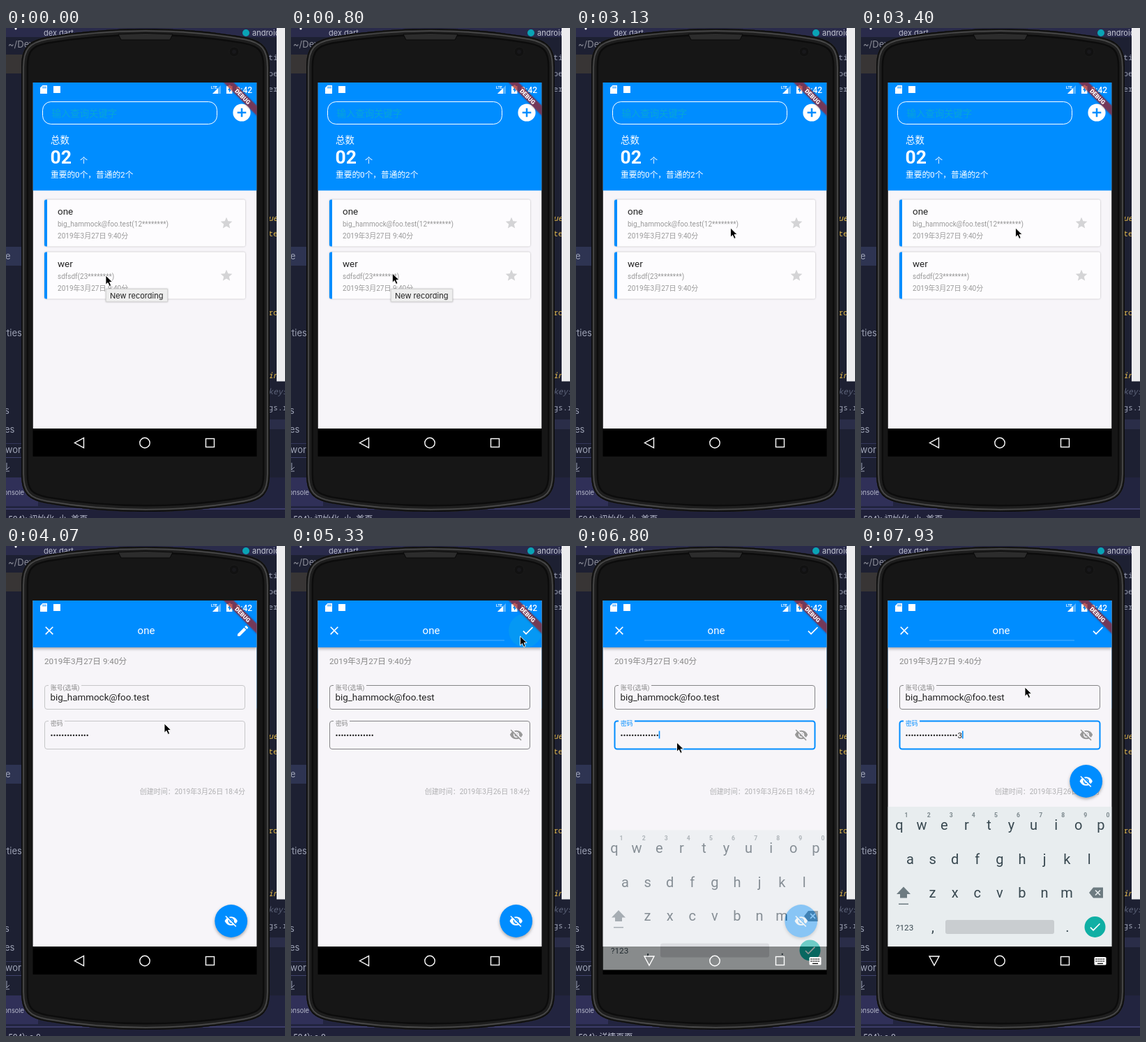
Animation, 400 px wide and 701 px high, one loop 8000 ms. Source, as an HTML page:

```html
<!DOCTYPE html>
<html lang="zh">
<head>
<meta charset="utf-8">
<title>Password notes</title>
<style>
  html, body { margin: 0; width: 100%; height: 100%; overflow: hidden; background: #1d2032; }
  svg { display: block; width: 100vw; height: 100vh; }
  text { font-family: Roboto, "Noto Sans CJK SC", "Noto Sans CJK", sans-serif; white-space: pre; }
  .mid { text-anchor: middle; }
  .end { text-anchor: end; }
  .ui { font-family: Inter, Roboto, sans-serif; }
  .code { font-family: "Noto Sans Mono", "DejaVu Sans Mono", monospace; }
  .card { filter: drop-shadow(0 .8px .8px #0004); }
  .raised { filter: drop-shadow(0 2px 2px #0005); }
  .line { fill: none; stroke: #fff; stroke-width: 1.4; }
</style>
</head>
<body>
<script>
const LOOP = 8000;
const BLUE = '#008dff', PAGE = '#f7f5f9';
const ACCOUNT = 'big_hammock@foo.test';
const EDITED = '2019年3月27日 9:40分';
const LEFT = 38.5, WIDTH = 321;   // phone screen

const text = (x, y, size, fill, content, extra = '') =>
  `<text x="${x}" y="${y}" font-size="${size}" fill="${fill}" ${extra}>${content}</text>`;
const rect = (x, y, w, h, fill, extra = '') =>
  `<rect x="${x}" y="${y}" width="${w}" height="${h}" fill="${fill}" ${extra}/>`;
const circle = (x, y, r, fill, extra = '') =>
  `<circle cx="${x}" cy="${y}" r="${r}" fill="${fill}" ${extra}/>`;
const band = (y, h, fill, extra) => rect(LEFT, y, WIDTH, h, fill, extra);
// 24-unit icon drawn at 20 px around a centre
const icon = (name, x, y, color, extra = '') =>
  `<use href="#${name}" transform="translate(${x - 10} ${y - 10}) scale(.836)" fill="${color}" stroke="${color}" ${extra}/>`;

const PHONE = 'M22 56C22 28 32 18 58 13C110 4 160 1 200 1S290 4 342 13C368 18 378 28 378 56V638' +
  'C378 666 368 675 342 680C290 689 240 692 200 692S110 689 58 680C32 675 22 666 22 638Z';

const defs = `<defs>
  <clipPath id="screen">${band(78, 535)}</clipPath>
  <clipPath id="content">${band(78, 495)}</clipPath>
  <clipPath id="body"><path d="${PHONE}"/></clipPath>
  <mask id="slit"><rect width="24" height="24" fill="#fff"/><path d="M3 1.5L22.5 21" stroke="#000" stroke-width="2.4"/></mask>
  <path id="star" stroke="none" d="M12 17.27L18.18 21l-1.64-7.03L22 9.24l-7.19-.61L12 2 9.19 8.63 2 9.24l5.46 4.73L5.82 21z"/>
  <path id="check" stroke="none" d="M9 16.17L4.83 12l-1.42 1.41L9 19 21 7l-1.41-1.41z"/>
  <path id="close" stroke-width="2" d="M5.7 5.7L18.3 18.3M18.3 5.7L5.7 18.3"/>
  <path id="pencil" stroke="none" d="M3 17.25V21h3.75L17.81 9.94l-3.75-3.75zM20.71 7.04c.39-.39.39-1.02 0-1.41l-2.34-2.34c-.39-.39-1.02-.39-1.41 0l-1.83 1.83 3.75 3.75z"/>
  <g id="eyeOff"><g mask="url(#slit)" stroke="none">
    <path fill-rule="evenodd" d="M1 12Q4.5 4.5 12 4.5T23 12Q19.5 19.5 12 19.5T1 12zM7 12a5 5 0 0 0 10 0a5 5 0 0 0-10 0z"/>
    <circle cx="12" cy="12" r="3"/></g><path d="M2.6 3.6L20.4 21.4" stroke-width="1.8"/></g>
</defs>`;

function desktop() {
  const grey = '#9da2b4', gold = '#e2b84c', dim = '#5d6379';
  const left = [['~/Dev', 3, 28, '#8b8d98'], ['e', -1, 331], ['rties', -4, 441], ['s', -2, 552],
    ['es', -2, 579], ['swor', -8, 608]];
  const right = [['ti', 46, grey], ['pe', 69, grey], ['er', 91, grey], ['ue', 276, gold, 1], ['te', 298, gold],
    ['ro', 411, gold], ['in', 501, gold, 1], ['keys', 524, dim, 1], ['gs.r', 547, grey]];
  return rect(0, 0, 400, 701, '#1d2032') + rect(0, 0, 400, 13, '#2a2b4b') +
    rect(0, 38, 60, 27, '#383535') + rect(0, 313, 60, 27, '#2e3452') +
    rect(0, 594, 60, 1, '#34375a') + rect(0, 614, 60, 1, '#41446c') + rect(340, 560, 60, 14, '#2a2d48') +
    rect(0, 643, 400, 44, '#22243f') + rect(0, 643, 46, 41, '#303058') +
    rect(0, 687, 400, 2, '#3c3c68') + rect(0, 689, 400, 12, '#1f2038') +
    circle(14, 1, 1.5, '#fff') +
    text(54, 11, 11, '#b9bccb', 'dex.dart', 'class="ui"') + circle(344, 7, 5, '#0aa3b5') +
    text(353, 11, 11, '#c5c8d4', 'android', 'class="ui"') +
    left.map(([s, x, y, c = grey]) => text(x, y, 13, c, s, 'class="ui"')).join('') +
    right.map(([s, y, c, slant]) => text(376, y, 11.5, c, s, `class="code" ${slant ? 'font-style="italic"' : ''}`)).join('') +
    `<path d="M1 622v9M-3 628l4 4 4-4M-2 634h7" fill="none" stroke="${grey}"/>` +
    text(-3, 668, 9.2, '#b7bacb', 'onsole', 'class="ui"') +
    text(0, 707, 12, '#b7bacb', '', 'id="log"') + rect(388, 0, 12, 505.5, '#ececee');
}

function phone() {
  // nested rims, each stroke covering the inner half of its width
  const rims = [[20, '#0c0c0c'], [15, '#1e1e1e'], [8, '#4c4c4c'], [5, '#262626'], [2.4, '#0a0a0a']];
  return `<path d="${PHONE}" fill="#161616"/><g clip-path="url(#body)" fill="none">` +
    rims.map(([w, c]) => `<path d="${PHONE}" stroke="${c}" stroke-width="${w}"/>`).join('') + '</g>' +
    `<path d="M161 9Q200 6 239 9L235 17H165Z" fill="#2c2c2c" stroke="#090909"/>` +
    circle(327, 34, 7, '#111', 'stroke="#1b1b1b"') + circle(327, 34, 3, '#18181b') + band(78, 535, '#000');
}

function entry(y, title, detail) {
  return rect(55, y, 288, 67, '#fdfcfe', 'rx="2.5" class="card"') +
    `<path d="M59 ${y}h-1.500q-2.500 0-2.500 2.500v62q0 2.500 2.500 2.500h1.500z" fill="${BLUE}"/>` +
    text(74, y + 21, 13.4, '#222', title) + text(74, y + 38, 10.03, '#999', detail) +
    text(74, y + 55, 10.03, '#999', EDITED) + icon('star', 316, y + 33.5, '#d4d4d6');
}

function listPage() {
  return band(78, 495, PAGE) + band(78, 154.5, BLUE) +
    rect(52.5, 105.5, 250, 32, 'none', 'rx="12" stroke="#fff"') +
    text(65.5, 127, 13.4, '#06a6d6', '输入查询关键字') +
    circle(338, 121, 12.6, '#fff') + `<path d="M331.700 121h12.600M338 114.700v12.600" stroke="${BLUE}" stroke-width="2.5"/>` +
    text(64, 165, 13.4, '#fff', '总数') + text(63.5, 194, 26.6, '#fff', '02', 'font-weight="700"') +
    text(106, 193.5, 11, '#fff', '个') + text(64, 214, 11.7, '#fff', '重要的0个，普通的2个') +
    entry(245.5, 'one', ACCOUNT + '(12********)') + entry(320.5, 'wer', 'sdfsdf(23********)');
}

function field(id, y, h, label, gap) {
  return rect(55.5, y, 287, h, 'none', `id="${id}" rx="3.5"`) + rect(61, y - 2, gap, 4, PAGE) +
    text(64, y + 6, 8.8, '#888', label, `id="${id}Label"`);
}

function detailPage() {
  return band(78, 495, PAGE) + band(78, 67, BLUE, 'class="raised"') +
    circle(336, 121, 24, '#12b4d8', 'id="ripple"') +
    icon('close', 62, 121, '#fff') + text(201, 126, 15, '#fff', 'one', 'class="mid"') +
    rect(98, 134.5, 208, 1, '#fff', 'class="edit" opacity=".3"') +
    icon('pencil', 339.5, 121.5, '#fff', 'id="pencilButton"') + icon('check', 339.5, 121, '#fff', 'class="edit"') +
    text(55, 169, 11.7, '#888', EDITED) +
    field('account', 199.5, 34, '账号(选填)', 47) + text(63.5, 221, 13.4, '#222', ACCOUNT) +
    field('secret', 250.5, 40, '密码', 23) + text(63.5, 274.5, 11.7, '#222', '', 'id="dots"') +
    rect(0, 264.5, 1.6, 11, BLUE, 'id="caret"') + icon('eyeOff', 323, 270, '#999', 'class="edit"') +
    text(343, 355, 10.03, '#b0b0b2', '创建时间：2019年3月26日 18:4分', 'class="end"') +
    `<g id="fab">${circle(322.7, 536.5, 23.4, BLUE, 'class="raised"')}${icon('eyeOff', 322.7, 536.5, '#fff')}</g>`;
}

function keyboard() {
  const ink = '#37474f', soft = '#6d7b81';
  const row = (letters, x, y) => [...letters].map((c, i) => text(x + i * 32.1, y, 20, ink, c, 'class="mid"')).join('');
  const digits = [...'1234567890'].map((c, i) =>
    text(65 + i * 32.1, 388, 8.6, '#7c888d', c, 'class="mid" font-weight="700"')).join('');
  return band(373, 200, '#e8edef') + digits +
    row('qwertyuiop', 55, 405.5) + row('asdfghjkl', 70.5, 455) + row('zxcvbnm', 102.5, 503) +
    `<path d="M61 487.5l10 10.5h-5v5.500h-10v-5.500h-5z" fill="${soft}"/>` + rect(54, 511.5, 14, 1.5, soft) +
    `<path d="M327 496l6-7.500h14v15h-14z" fill="${soft}"/><path d="M336 492.500l7 7m0-7l-7 7" stroke="#e8edef" stroke-width="1.6"/>` +
    text(50, 549.5, 11.7, ink, '?123') + text(103, 552, 20, ink, ',', 'class="mid"') +
    rect(121, 535, 156, 20, '#c9cdd0', 'rx="3"') + text(296, 552, 20, ink, '.', 'class="mid"') +
    circle(335.5, 545, 15, '#0fafa4') + icon('check', 335.5, 545, '#fff');
}

function statusBar() {
  return `<path d="M52.500 82h6.500v12h-10v-8.500z" fill="#fff"/><path d="M53 83.500v3m2-3v3m2-3v3" stroke="${BLUE}"/>` +
    rect(68, 83, 10, 10, '#fff') + text(294, 87, 5.4, '#fff', 'LTE', 'font-weight="700"') +
    `<path d="M308 82v12h-12z" fill="#fff" opacity=".35"/><path d="M304 86v8h-8z" fill="#fff"/>` +
    `<path d="M319 81.500h3v1.500h2.500v11h-8.500v-11h3z" fill="#fff"/><path d="M321 84.500l-3 4.500h2v3.500l3-4.500h-2z" fill="${BLUE}"/>` +
    text(329.5, 92.5, 12, '#fff', '9:42', 'font-weight="500"') +
    `<g transform="translate(${LEFT + WIDTH} 78) scale(.836) rotate(45)">` +
    rect(-50, 28, 100, 12, '#b71c1c', 'fill-opacity=".63" style="filter:drop-shadow(0 0 2px #0006)"') +
    text(0, 37.7, 10.2, '#fff', 'DEBUG', 'class="mid" font-weight="900"') + '</g>';
}

function navBar() {
  return `<path class="line" id="back" d="M111.500 586.500v14l-13-7z"/>
    <circle class="line" cx="199" cy="593.5" r="7.200"/><rect class="line" x="286.500" y="587.500" width="12" height="12"/>
    <g id="imeSwitch">${rect(334.5, 588, 17, 11.5, '#fff', 'rx="1.5"')}
    <path d="M336.500 591h13M336.500 594h13" stroke="#000" stroke-width="1.4" stroke-dasharray="1.5 1.2"/>
    <path d="M339 597.300h8" stroke="#000" stroke-width="1.2"/></g>`;
}

document.body.innerHTML = `<svg viewBox="0 0 400 701">${defs}${desktop()}${phone()}
  <g clip-path="url(#content)">${listPage()}<g id="detail">${detailPage()}</g></g>
  <g clip-path="url(#screen)"><g id="keyboard">${keyboard()}</g>${statusBar()}${navBar()}</g>
  <g id="tooltip">${rect(143.5, 373.5, 88, 18, '#eee', 'stroke="#d6d6d6" class="card"')}
  ${text(149, 386.5, 11, '#222', 'New recording', 'class="ui"')}</g>
  <path id="pointer" d="M0 0v13.200l3-2.800 2.300 5 2.400-1-2.200-4.900h4.200z" fill="#000" stroke="#fff" stroke-width=".9"/></svg>`;

const $ = id => document.getElementById(id);
const show = (el, on) => el.setAttribute('display', on ? 'inline' : 'none');
const progress = (t, start, length) => Math.min(1, Math.max(0, (t - start) / length));
const smooth = p => p * p * (3 - 2 * p);

const OPEN = 3470, EDIT = 5150, FOCUS = 6560, IME = 6720, TYPE = 7100, KEY_GAP = 140;
const TYPED = '123123';
// time, x, y
const TRAVEL = [[0, 143, 354], [700, 143, 354], [1500, 196.5, 285], [2300, 196.5, 285], [3000, 221.5, 286],
  [3550, 221.5, 286], [4050, 227, 254], [4250, 227, 254], [4950, 328.5, 129], [5550, 328.5, 129],
  [6350, 144.5, 281], [7250, 144.5, 281], [7930, 235, 202], [LOOP, 235, 202]];

function pointerAt(t) {
  const i = Math.max(1, TRAVEL.findIndex(k => k[0] > t));
  const [t0, x0, y0] = TRAVEL[i - 1], [t1, x1, y1] = TRAVEL[i];
  const p = smooth(progress(t, t0, t1 - t0));
  return [x0 + (x1 - x0) * p, y0 + (y1 - y0) * p];
}

function styleField(id, color, width, labelColor) {
  $(id).setAttribute('stroke', color);
  $(id).setAttribute('stroke-width', width);
  $(id + 'Label').setAttribute('fill', labelColor);
}

function render(t) {
  const editing = t >= EDIT, focused = t >= FOCUS;

  const enter = progress(t, OPEN, 300);
  $('detail').setAttribute('transform', `translate(0 ${124 * (1 - enter) ** 3})`);
  $('detail').setAttribute('opacity', enter * enter);
  show($('detail'), t >= OPEN);

  document.querySelectorAll('.edit').forEach(el => show(el, editing));
  show($('pencilButton'), !editing);
  $('ripple').setAttribute('r', 8 + 16 * progress(t, EDIT - 60, 200));
  $('ripple').setAttribute('opacity', t < EDIT - 60 ? 0 : .28 * (1 - progress(t, 5380, 220)));

  const border = editing ? '#858587' : '#c6c6c8';
  styleField('account', border, 1, '#888');
  styleField('secret', focused ? BLUE : border, focused ? 2 : 1, focused ? BLUE : '#888');

  const typed = t < TYPE ? 0 : Math.min(TYPED.length, 1 + Math.floor((t - TYPE) / KEY_GAP));
  $('dots').textContent = '•'.repeat(14 + Math.max(0, typed - 1)) + (typed ? TYPED[typed - 1] : '');
  $('caret').setAttribute('x', 63.5 + $('dots').getComputedTextLength());
  show($('caret'), focused);

  const rise = progress(t, IME, 250);
  $('keyboard').setAttribute('transform', `translate(0 ${100 * (1 - rise) ** 2.8})`);
  $('keyboard').setAttribute('opacity', Math.min(1, rise / .55));
  show($('keyboard'), t >= IME);
  show($('imeSwitch'), t >= IME);
  $('back').setAttribute('transform', t >= IME ? 'rotate(-90 105 593.5)' : '');
  $('fab').setAttribute('transform', `translate(0 ${t >= 6930 ? -200 : 0})`);

  show($('tooltip'), t < 2400);
  $('log').textContent = t < OPEN ? ' 504): 初始化  小  首页' : t > FOCUS && t < TYPE ? ' 504): 详情页面' : ' 504): a.0';
  $('pointer').setAttribute('transform', `translate(${pointerAt(t)})`);
}

function frame() {
  render(performance.now() % LOOP);
  requestAnimationFrame(frame);
}
frame();
</script>
</body>
</html>
```
